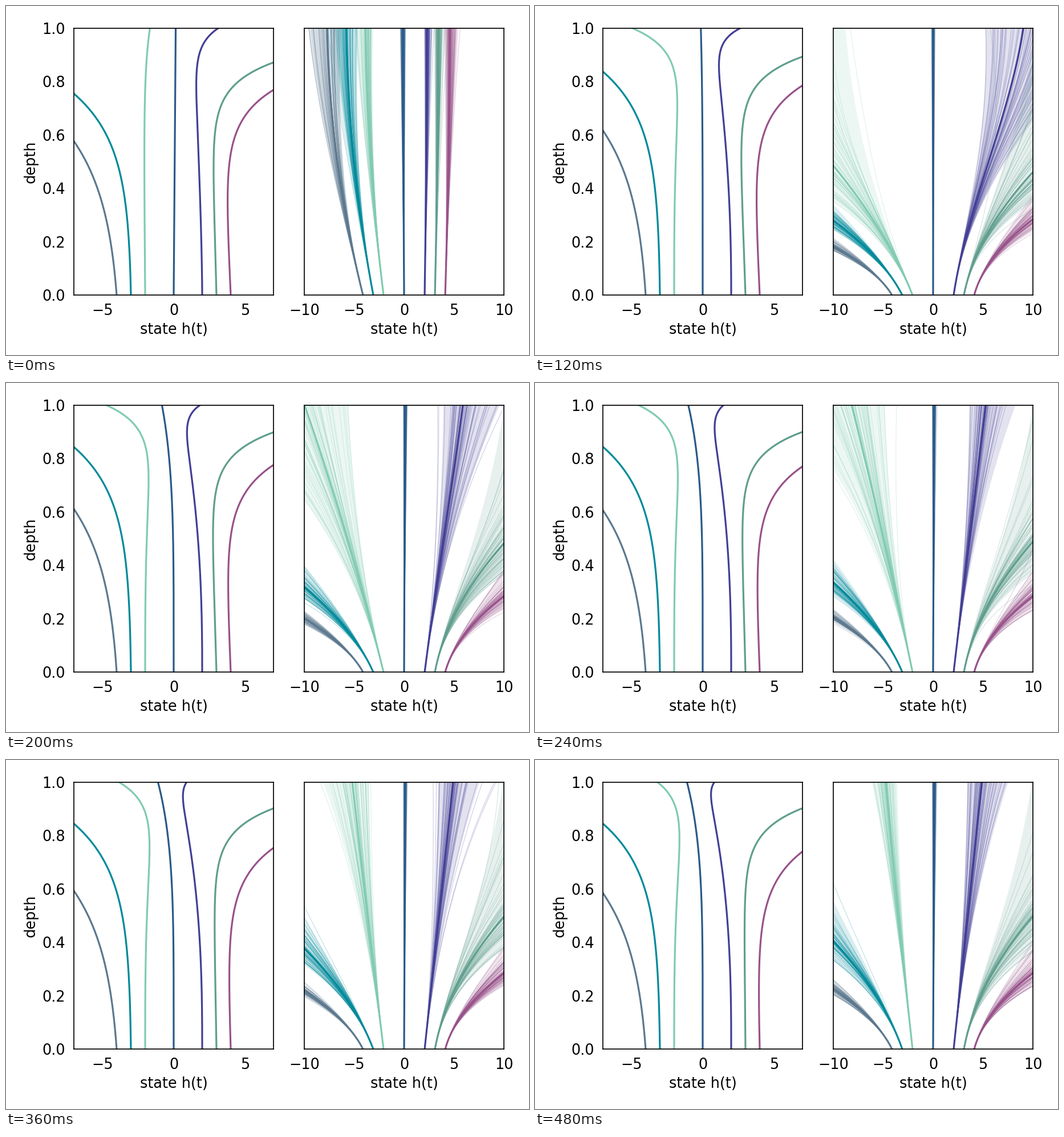
Write a matplotlib script that moves like this. It is 917 px wide and 611 px high and loops after 0.52 s.

```python
import numpy as np
import matplotlib.pyplot as plt
from matplotlib.animation import FuncAnimation
from matplotlib.collections import LineCollection

W, H = 917, 611
FRAMES, INTERVAL = 13, 40
SAMPLES = 60
BAND = 2.2  # half width of the shaded band, in standard deviations
t = np.linspace(0, 1, 140)

STARTS = [-4, -3, -2, 0, 2, 3, 4]
COLORS = ["#5b788f", "#008a9b", "#80cbb2", "#2b5a8a", "#433f95", "#5f9e8d", "#98528a"]


def rise(n, pace):
    """Goes from 0 towards 1, quickly at first."""
    return 1 - np.exp(-n / pace)


def step(n, middle, width):
    """Smooth switch from 0 to 1."""
    return 1 / (1 + np.exp((middle - n) / width))


def hump(n):
    """Grows to 1 at n = 3, then fades."""
    return n / 3 * np.exp(1 - n / 3)


def flows(n):
    """Per curve: drift, power, end, shift at the end, growth rate."""
    quick, slow = rise(n, .5), rise(n, 3)
    turn = step(n, 2, .3)
    mint_top = (1 - turn) * (.34 + .96 * n) + turn * (.22 * n - 3.8)
    lean = .15 - 1.25 * step(n, 4, .8)
    return [
        (0, 1, .577 + .04 * hump(n), -3, 3.8),
        (0, 1, .755 + .09 * rise(n, 1.2), -4, 5.3),
        (1.05 * quick + .02 * n - .16, 1 + 2 * quick, 1, mint_top, 6 + 6 * quick),
        (lean, 1 + 3.4 * rise(n, 1.5), 1, lean, 5),
        (-.68 - 1.1 * slow, 1.5 + 1.1 * slow, 1,
         1.2 - 2.4 * step(n, 4.6, 1.4), 16 + 1.2 * n),
        (.032 * n - .52 - .25 * hump(n), 1, .872 + .031 * rise(n, 2.5), 4, 11.5),
        (.033 * n - .9 - .1 * hump(n), 1, .769 + .025 * hump(n) - .0028 * n, 3,
         8.5 - .1 * n),
    ]


def flow_path(start, drift, power, end, shift, rate):
    rest = shift - drift * end ** power
    return start + drift * t ** power + rest * np.expm1(rate * t) / np.expm1(rate * end)


def bundles(n):
    """Per bundle: goal, time it is reached, curve, bend, spread."""
    if n == 0:  # before training all bundles share one simple shape
        return [(h * 1.93, 1, .85, 0, .18) if h < 0 else (h * 1.15 - .1 * (h == 0), 1, .7, 0, .4)
                for h in STARTS]
    fast = 1 - step(n, 3.4, .9)
    return [
        (-10, .14 + .095 * rise(n, 5), -.5, 0, .08),
        (-10, .2 + .28 * rise(n, 9), -.45, 0, .09 + .005 * n),
        (-10 + 5.3 * step(n, 6.5, 1.1), .33 + .67 * step(n, 3.9, .7),
         1.05 * rise(n, 4) - .9, 0, .13 + .19 * np.sin(np.pi * n / FRAMES)),
        (.12 - .7 * np.exp(-n / 1.6), 1, 0, 0, .2),
        (4.9 + 6.8 * fast, 1, 0, -.7 * fast, .28 + .1 * fast),
        (10, .37 + .13 * rise(n, 2.5), -.65, 0, .27),
        (10, .285, -.65, 0, .16),
    ]


def bundle_path(start, goal, end, curve, bend, spread, z=0, w=0):
    """Path that lies z deviations from the centre; w makes paths cross."""
    tau = t / end
    shape = tau + tau * (1 - tau) * (curve + bend * (1 - 2 * tau))
    fan = np.exp(spread * (z * tau + .2 * w * tau ** 2))
    return start + (goal - start) * shape * fan + .07 * np.sign(goal) * z * t


def px(n):
    """Pixels to points."""
    return n * 72 / 100


plt.rcParams.update({"font.family": "DejaVu Sans", "font.size": px(25.5),
                     "axes.linewidth": px(1.7)})
fig = plt.figure(figsize=(W / 100, H / 100), dpi=100, facecolor="white")


def panel(left, lim):
    ax = fig.add_axes([left / W, 1 - 506 / H, 350 / W, 467 / H])
    ax.set(xlim=(-lim, lim), ylim=(0, 1))
    ax.tick_params(length=0, pad=px(14.9))
    ax.set_xlabel("state h(t)", labelpad=px(7))
    return ax


ax_flow = panel(119, 7)
ax_flow.set_xticks([-5, 0, 5])
ax_flow.set_ylabel("depth", labelpad=px(7))
ax_post = panel(523, 10)
ax_post.set_xticks([-10, -5, 0, 5, 10])
ax_post.set_yticks([])

flow_lines, bands, threads, centres = [], [], [], []
for color in COLORS:
    main = dict(color=color, lw=px(3.2))
    flow_lines += ax_flow.plot([], [], **main)
    bands.append(ax_post.fill_betweenx(t, 0 * t, 0 * t, color=color, alpha=.15, lw=0))
    threads.append(ax_post.add_collection(
        LineCollection([], colors=color, linewidths=px(1.05), alpha=.28), autolim=False))
    centres += ax_post.plot([], [], **main)


def update(n):
    rng = np.random.default_rng(100 + n)
    for i, (start, flow, bundle) in enumerate(zip(STARTS, flows(n), bundles(n))):
        flow_lines[i].set_data(flow_path(start, *flow), t)
        shape = (start * 1.03, *bundle)
        centres[i].set_data(bundle_path(*shape), t)
        z, w = rng.normal(size=(2, SAMPLES, 1))
        threads[i].set_segments(
            [np.column_stack([p, t]) for p in bundle_path(*shape, z, w)])
        low, high = bundle_path(*shape, -BAND), bundle_path(*shape, BAND)
        bands[i].set_verts(
            [np.column_stack([np.r_[low, high[::-1]], np.r_[t, t[::-1]]])])
    return flow_lines + bands + threads + centres


anim = FuncAnimation(fig, update, frames=FRAMES, interval=INTERVAL,
                     repeat=True, repeat_delay=0, blit=False)
plt.show()
```
